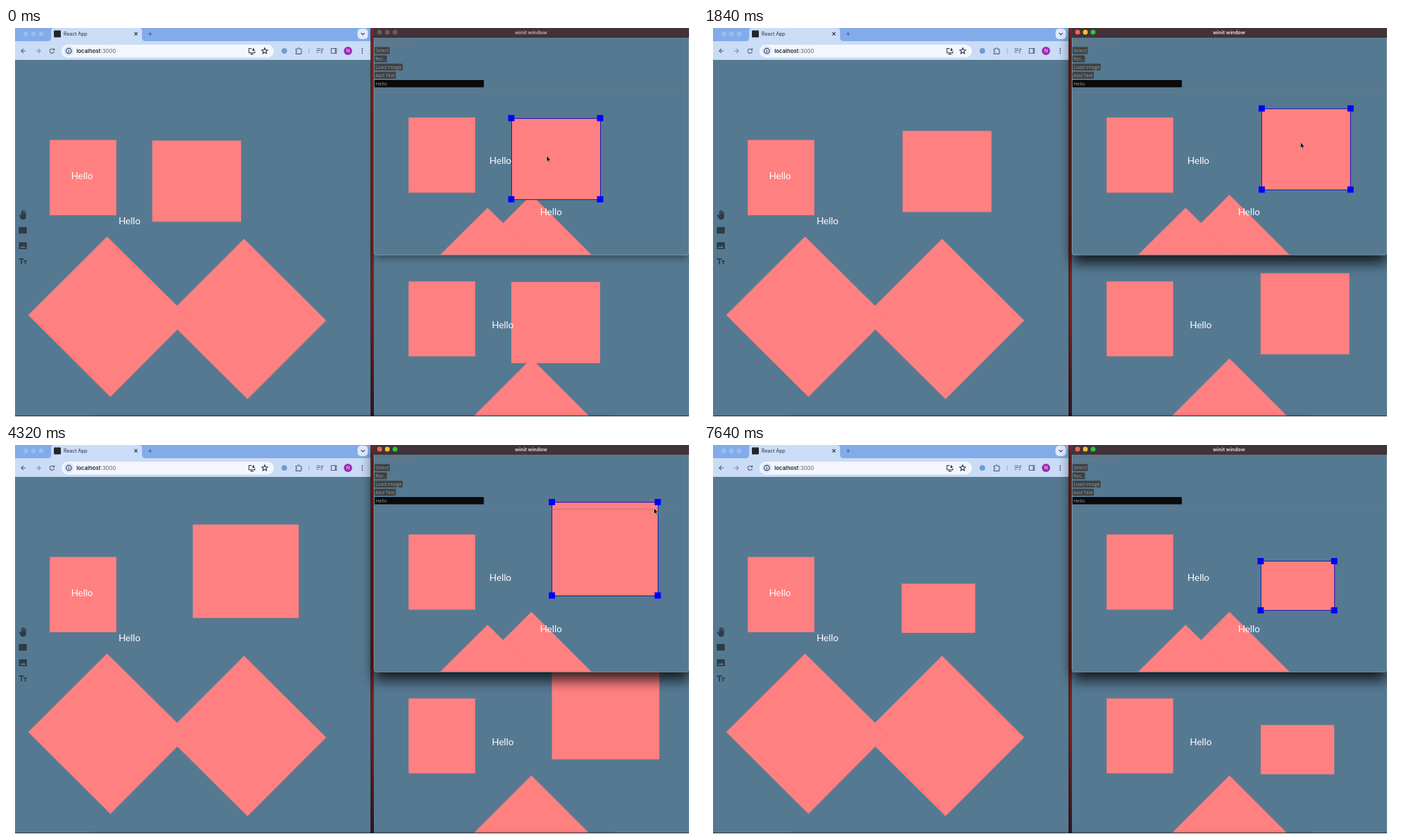
Recreate the animation shown at these times as an HTML page. Size 997 px wide and 561 px high, loop 8320 ms.

```html
<!DOCTYPE html>
<html lang="en">
<head>
<meta charset="utf-8">
<title>Shared canvas</title>
<style>
  html, body { margin: 0; width: 100%; height: 100%; overflow: hidden; background: #fff; }
  svg { display: block; width: 997px; height: 561px; }
  text { font-family: Inter, Roboto, sans-serif; }
  .pink { fill: #ff8080; }
  .seam { fill: none; stroke: #ee7879; stroke-width: .6; }
  .hello { font: 400 13.6px Lato, "Open Sans", sans-serif; fill: #fff; }
  .panel text { font: 400 7px "Open Sans", "Noto Sans", sans-serif; fill: #98999b; }
  .line { fill: none; stroke: #55637a; stroke-width: 1.1; }
  .ink { stroke: #26344a; }
</style>
</head>
<body>
<svg viewBox="0 0 997 561" xmlns="http://www.w3.org/2000/svg">
  <defs>
    <clipPath id="screen"><rect x="13" width="971" height="560"/></clipPath>
    <clipPath id="canvasClip"><path d="M530 14H984V324Q984 327 981 327H533Q530 327 530 324Z"/></clipPath>
    <filter id="blur" x="-20%" y="-20%" width="140%" height="150%"><feGaussianBlur stdDeviation="9.5"/></filter>
    <filter id="blurSmall" x="-20%" y="-20%" width="140%" height="150%"><feGaussianBlur stdDeviation="6"/></filter>
    <linearGradient id="wall" x2="0" y2="1">
      <stop offset="0" stop-color="#8a2a20"/><stop offset=".75" stop-color="#7a1d18"/><stop offset="1" stop-color="#2a1420"/>
    </linearGradient>
  </defs>

  <g clip-path="url(#screen)">
    <rect x="13" width="971" height="560" fill="url(#wall)"/>

    <!-- browser window -->
    <rect x="13" width="512.5" height="560" fill="#567992"/>
    <rect x="13" width="512.5" height="20" fill="#82abe9"/>
    <path d="M60 19Q65 19 65 14V4Q65 0 69 0H192Q196 0 196 4V14Q196 19 201 19H525.5V46H13V19Z" fill="#cadcf6"/>
    <g id="idleLights" fill="#9bbcf0"></g>
    <rect x="69" y="3.5" width="10" height="10" rx="1" fill="#20262c"/>
    <text x="83" y="11" font-size="7" fill="#27313f">React App</text>
    <path class="line ink" d="M185 6.2l4.4 4.4m0-4.4l-4.4 4.4"/>
    <path class="line" d="M205 8.5h5.4m-2.7-2.7v5.4"/>
    <rect x="506.5" y="1" width="15" height="15" rx="5" fill="#dfeafb"/>
    <path class="line ink" d="M511.5 7.2l2.6 2.6 2.6-2.6"/>
    <rect x="80" y="24" width="306" height="18.5" rx="9.2" fill="#f3f7fd"/>
    <circle cx="90.5" cy="33" r="7" fill="#d6e4f8"/>
    <circle class="line ink" cx="90.5" cy="33" r="3.7"/>
    <path class="line ink" d="M90.5 32.5v2.4m0-4.2v.9"/>
    <text x="101.5" y="36" font-size="7.9" font-weight="600" fill="#20293a">localhost<tspan font-weight="400" fill="#525c6c">:3000</tspan></text>
    <path class="line" d="M28.6 33h-6.6m3-3l-3 3 3 3"/>
    <path class="line" d="M43 33h6.6m-3-3l3 3-3 3" opacity=".6"/>
    <path class="line" d="M69 31.4A3.2 3.2 0 1 0 69.4 34M69.6 29.4v2.4h-2.4"/>
    <path class="line ink" d="M354 29.5h-4v6.2h8.5v-2M352 37.6h4.5M356.5 29v3.6m-1.7-1.6l1.7 1.7 1.7-1.7"/>
    <path class="line ink" d="M372.7 28.8l1.2 2.7 3 .3-2.2 2 .7 3-2.7-1.6-2.7 1.6.7-3-2.2-2 3-.3z"/>
    <circle cx="401" cy="33" r="4" fill="#6f9bd0"/>
    <path class="line" d="M417.8 30.2h2.4a1.4 1.4 0 0 1 2.8 0h2.2v2.4a1.4 1.4 0 0 1 0 2.7v2.1h-7.4v-2.1a1.4 1.4 0 0 0 0-2.7z"/>
    <path d="M436.8 29v8" stroke="#8faee0"/>
    <path class="line" d="M447.5 30h6m-6 2.5h6m-6 2.5h3M455.3 30v5.3m0-5h2.2M453.5 36h1.5"/>
    <path class="line" d="M468.6 29.5h7.4v7h-7.4zM474.5 29.5v7"/>
    <circle cx="492.7" cy="33" r="6" fill="#9b2db2"/>
    <text x="492.7" y="35.4" font-size="6.5" fill="#fff" text-anchor="middle">N</text>
    <path d="M513.3 30v6.1" stroke="#46546a" stroke-width="1.8" stroke-linecap="round" stroke-dasharray="0 3"/>

    <rect class="pink" x="63" y="161.5" width="96" height="108.5"/>
    <path class="pink" d="M343 304L461.3 421.8 348 535.3 229.4 417.6Z"/>
    <path class="pink" d="M145.6 300.8L264 417.8 150.4 532 32 414Z"/>
    <path class="seam" d="M247 402L264 417.8 247 434.5"/>
    <rect class="pink" id="left"/>
    <text class="hello" x="93.7" y="217.5">Hello</text>
    <text class="hello" x="162.2" y="283">Hello</text>

    <g fill="#2d3c47">
      <path d="M18.7 270l1.1-.9 2 1.6v-6.3q.7-1 1.4 0v3.8h.4v-5.1q.7-1 1.5 0v5h.5v-4.5q.7-.9 1.4 0v4.8h.5v-3.2q.7-.9 1.5 0v6.2q0 4.9-4.3 5-2.8 0-4-2.2z"/>
      <rect x="18.3" y="287" width="11.7" height="9.6" rx="1"/>
      <path fill-rule="evenodd" d="M18.6 309h11.4v10H18.6zM20.3 317.3h8l-2.6-3.6-2 2.5-1.4-1.6z"/>
      <path d="M18.6 332.3h7.2v1.7h-2.7v7h-1.8v-7h-2.7zM25.2 335.2h5v1.6h-1.7v4.2h-1.6v-4.2h-1.7z"/>
    </g>

    <!-- second browser window, mostly covered -->
    <rect x="530" y="300" width="454" height="260" fill="#567992"/>
    <rect class="pink" x="580" y="365.5" width="96" height="108"/>
    <rect class="pink" id="lower"/>
    <path class="pink" d="M757 476.4L840.4 560H673.6Z"/>
    <text class="hello" x="700" y="432.5">Hello</text>

    <rect x="120" y="562" width="760" height="30" rx="12" filter="url(#blurSmall)" opacity=".3"/>
    <path d="M13 559.5H525.5M530 559.5H984" stroke="#24333f"/>
    <path d="M525.8 0V560" stroke="#1d1618" stroke-width=".8"/>

    <!-- native window -->
    <rect id="shadowIdle" x="532" y="4" width="450" height="327" filter="url(#blurSmall)" opacity=".45"/>
    <rect id="shadowActive" x="530" y="9" width="454" height="330" filter="url(#blur)" opacity=".78"/>
    <g clip-path="url(#canvasClip)">
      <rect x="530" y="14" width="454" height="313" fill="#567992"/>
      <rect class="pink" x="580" y="129" width="96" height="108.5"/>
      <path class="pink" d="M757 240.5L845 328.5H669Z"/>
      <path class="pink" d="M693.8 259.2L764 328H624.5Z"/>
      <path class="seam" d="M716.5 281.5L763 327"/>
      <rect class="pink" id="main"/>
      <rect id="outline" fill="none" stroke="#2016b8" shape-rendering="crispEdges"/>
      <text class="hello" x="696.6" y="195.5">Hello</text>
      <text class="hello" x="769.4" y="270">Hello</text>
      <path d="M531 92.5H984" stroke="#6b7b85" stroke-width=".7" opacity=".75"/>
      <g id="handles" fill="#00f"></g>
      <g class="panel" id="panel"><text x="531" y="23.5" style="font-size:9px;fill:#74777a">Network Apps</text></g>
    </g>
    <rect x="530" width="454" height="14" fill="#413338"/>
    <path d="M530.3 14V324Q530.3 327.3 533 327.3H981Q983.7 327.3 983.7 324V14" fill="none" stroke="#95a3ac" stroke-width=".8"/>
    <g id="lights"></g>
    <text id="title" x="756.4" y="8.6" font-size="7.2" font-weight="700" text-anchor="middle">winit window</text>
    <path id="cursor" d="M0 0V8.2L1.9 6.4 3.2 9.3 4.6 8.7 3.3 5.9H5.9Z" stroke="#e8d0d4" stroke-width=".6"/>
  </g>
</svg>

<script>
const LOOP = 8320, STEP = 40, FOCUS_AT = 520, POINTER_LEAD = 80;
const $ = id => document.getElementById(id);

function set(node, attrs) {
  for (const key in attrs) node.setAttribute(key, attrs[key]);
}
function add(parent, tag, attrs, text = "") {
  const node = document.createElementNS("http://www.w3.org/2000/svg", tag);
  set(node, attrs);
  node.textContent = text;
  parent.append(node);
  return node;
}

["Select", "Rec..", "Load Image", "Add Text"].forEach((label, i) => {
  const y = 27.6 + i * 11.9;
  const box = add($("panel"), "rect", { x: 530.5, y, height: 9.8, rx: 1, fill: "#3d4043" });
  const text = add($("panel"), "text", { x: 532.2, y: y + 7.3 }, label);
  set(box, { width: text.getComputedTextLength() + 3 });
});
add($("panel"), "rect", { x: 530.5, y: 75, width: 158, height: 10.6, rx: 1, fill: "#0a0a0a" });
add($("panel"), "text", { x: 532.2, y: 82.5 }, "Hello");

const handles = [0, 1, 2, 3].map(() => add($("handles"), "rect", { width: 9, height: 9 }));
const lightRow = (id, x, y) =>
  [0, 1, 2].map(i => add($(id), "circle", { cx: x + i * 11.1, cy: y, r: 3.5 }));
lightRow("idleLights", 28.5, 8.5);
const lights = lightRow("lights", 538.3, 6);

// Paths of the held corner: [time, x, y]
const move = { grab: [51, 54.5], path: [
  [520, 728, 130], [1160, 778, 126], [1840, 803.5, 116], [2160, 820, 92], [2960, 763, 125.5], [3480, 786.5, 100]
] };
const resize = { grab: [0, 0], path: [
  [3880, 914.5, 100], [4200, 942, 79], [4320, 939, 82.3], [4720, 910, 130], [5120, 892.5, 146]
] };
const moveAgain = { grab: [75, 37], path: [[5280, 786.5, 146], [6080, 851.5, 189.5], [6840, 802, 167.5]] };
const leave = { grab: [0, 0], path: [[7560, 930, -14]] };
const gestures = [move, resize, moveAgain, leave];

// Cubic spline at rest at both ends
function follow(path, t) {
  const last = path.length - 1;
  const next = path.findIndex(key => key[0] > t);
  if (next === 0) return path[0].slice(1);
  if (next < 0) return path[last].slice(1);
  const i = next - 1, span = path[next][0] - path[i][0], u = (t - path[i][0]) / span;
  const ease = u * u * (3 - 2 * u);
  return [1, 2].map(c => {
    const slope = k => k === 0 || k === last ? 0
      : (path[k + 1][c] - path[k - 1][c]) / (path[k + 1][0] - path[k - 1][0]);
    return path[i][c] + (path[next][c] - path[i][c]) * ease
      + span * u * (1 - u) * (slope(i) * (1 - u) - slope(next) * u);
  });
}

function shapeAt(t) {
  if (t < 3880) return [...follow(move.path, t), 128, 117];
  if (t >= 5280) return [...follow(moveAgain.path, t), 106, 71];
  const [right, top] = follow(resize.path, t);
  return [786.5, top, right - 786.5, 217 - top];
}

function pointerAt(t) {
  const ahead = t + POINTER_LEAD;
  const held = ({ path, grab }, at) => follow(path, at).map((v, c) => v + grab[c]);
  const next = gestures.findIndex(g => g.path[0][0] > ahead);
  const current = next < 0 ? leave : gestures[Math.max(0, next - 1)];
  const end = current.path.at(-1)[0];
  if (next <= 0 || ahead <= end) return held(current, ahead);
  const from = held(current, end), to = held(gestures[next], 0);
  const u = (ahead - end) / (gestures[next].path[0][0] - end);
  return from.map((v, c) => v + (to[c] - v) * u * u * (3 - 2 * u));
}

function place(node, [x, y, width, height], dx = 0, dy = 0) {
  set(node, { x: x + dx, y: y + dy, width, height });
}

function render(time) {
  const t = Math.floor((time % LOOP) / STEP) * STEP;
  const shape = shapeAt(t), [x, y, w, h] = shape;
  place($("main"), shape);
  place($("outline"), shape);
  place($("left"), shape, -517.3, 32.4);
  place($("lower"), shapeAt(t - STEP), 0, 236.3);
  handles.forEach((node, i) => set(node, { x: x + (i & 1) * w - 4.5, y: y + (i >> 1) * h - 4.5 }));
  set($("cursor"), { transform: `translate(${pointerAt(t)})` });

  const focused = t >= FOCUS_AT;
  $("shadowIdle").style.display = focused ? "none" : "";
  $("shadowActive").style.display = focused ? "" : "none";
  const colors = ["#ff5f57", "#febc2e", "#28c840"];
  lights.forEach((light, i) => set(light, { fill: focused ? colors[i] : "#665a5e" }));
  set($("title"), { fill: focused ? "#ddd3d6" : "#b5a9ad" });
}

const start = performance.now();
function tick() {
  render(performance.now() - start);
  requestAnimationFrame(tick);
}
tick();
</script>
</body>
</html>
```
